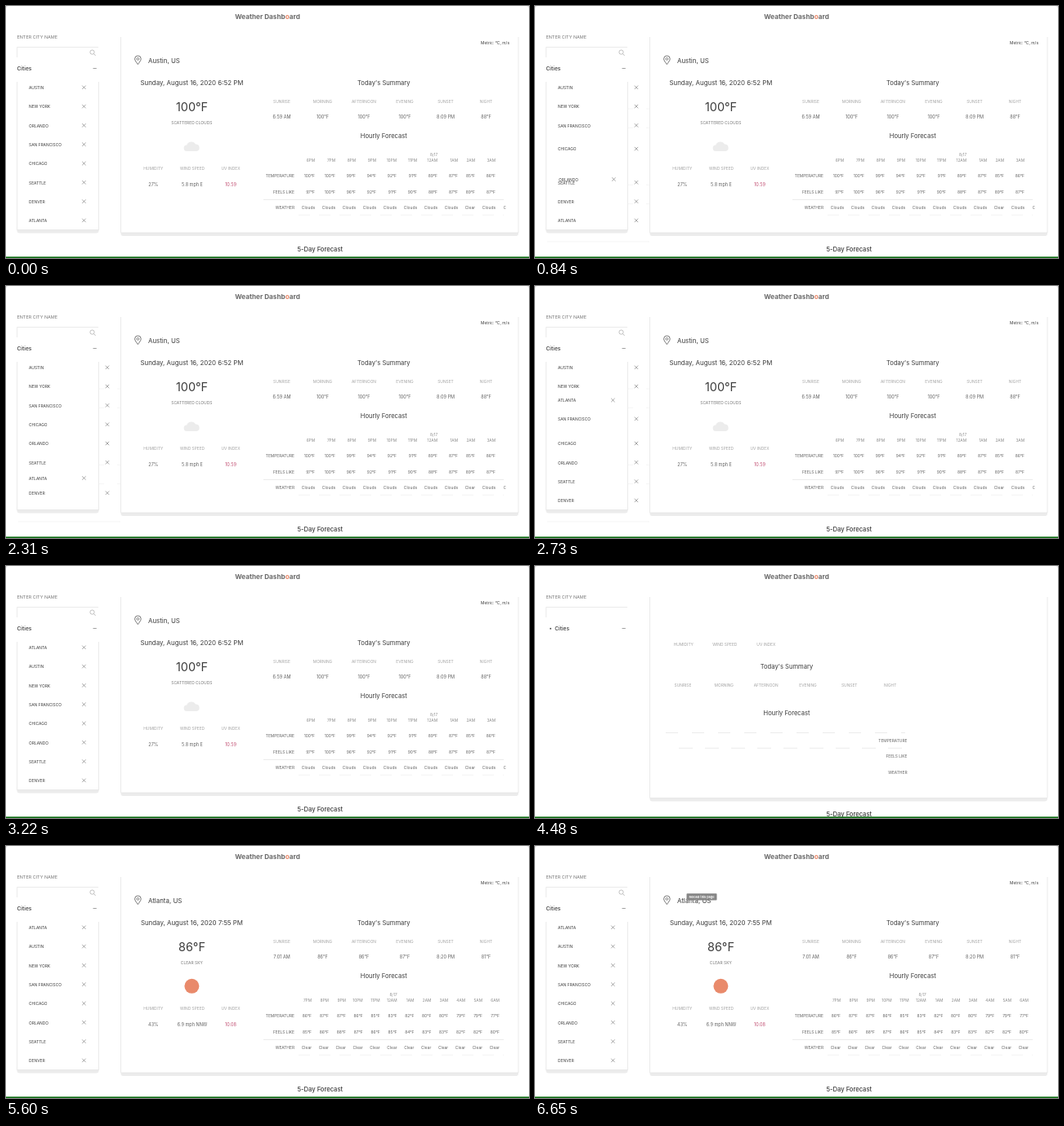
These frames come from a looping animation (640 by 309 pixels, 6860 ms). An HTML page:

```html
<!DOCTYPE html>
<html lang="en">
<head>
<meta charset="utf-8">
<title>Weather Dashboard</title>
<style>
  html, body { margin: 0; width: 100%; height: 100%; overflow: hidden; background: #fff; }
  svg { display: block; width: 640px; height: 309px; font-family: Inter, "Liberation Sans", sans-serif; }
</style>
</head>
<body>
<svg id="stage" viewBox="0 0 640 309"></svg>
<script>
const LOOP = 6860, STEP = 70, ROW = 23.3, TOP = 100.3;
const DARK = '#3c3c3c', MID = '#626262', PALE = '#a3a3a3', RULE = '#e2e2e2', SHADE = '#ececec';
const ORANGE = '#e98a6b', RED = '#c14f72';
const stage = document.getElementById('stage');

// Text centred vertically on y; anchor is s, m or e.
function text(x, y, str, size, fill = DARK, anchor = 'm', weight = 400) {
  const side = { s: 'start', m: 'middle', e: 'end' }[anchor];
  return `<text x="${x}" y="${(y + size * 0.364).toFixed(2)}" font-size="${size}" fill="${fill}" ` +
    `text-anchor="${side}" font-weight="${weight}">${str}</text>`;
}
const rect = (x, y, w, h, fill, rx = 0) =>
  `<rect x="${x}" y="${y}" width="${w}" height="${h}" rx="${rx}" fill="${fill}"/>`;
const line = (d, stroke = RULE, width = 0.7, extra = '') =>
  `<path d="${d}" fill="none" stroke="${stroke}" stroke-width="${width}" ${extra}/>`;
const group = (id, body) => `<g id="${id}">${body}</g>`;
const label = (x, y, str) => text(x, y, str, 4.85, PALE);
const heading = (x, y, str) => text(x, y, str, 7.6);
const labels = (xs, y, words) => xs.map((x, i) => label(x, y, words[i])).join('');
const card = (x, y, w, h) =>
  rect(x, y + h - 5, w, 9, SHADE, 3) + rect(x, y, w, h, '#fff') +
  line(`M${x} ${y}V${y + h}H${x + w}V${y}`);

const CURRENT = ['HUMIDITY', 'WIND SPEED', 'UV INDEX'];
const PARTS = ['SUNRISE', 'MORNING', 'AFTERNOON', 'EVENING', 'SUNSET', 'NIGHT'];
const ROWS = ['TEMPERATURE', 'FEELS LIKE', 'WEATHER'];
const PART_X = [337.5, 387.5, 438, 488, 538, 587.5];
const CURRENT_X = [180.3, 228, 275];
const fiveDay = y => text(384.3, y, '5-Day Forecast', 7.6, DARK, 'm', 500);
const rowNames = (x, y) => ROWS.map((r, i) => text(x, y + i * 19.3, r, 4.85, MID, 'e')).join('');

function sidebar() {
  return text(13.5, 38.5, 'ENTER CITY NAME', 5.45, '#777', 's') +
    line('M13.5 63V50.5H113') + line('M106.5 76.5h4.3', '#777');
}

const styled =
  line('M107.6 58.8l1.9 2', '#999') + '<circle cx="105.5" cy="56.6" r="2.6" fill="none" stroke="#999" stroke-width=".6"/>' +
  text(13.5, 76.3, 'Cities', 6.6, DARK, 's', 500) + card(13.5, 93, 100, 181.5);

const pin =
  line('M161.4 71.6C159.6 69 157.6 66.8 157.6 64.8A3.8 3.8 0 0 1 165.2 64.8C165.2 66.8 163.2 69 161.4 71.6Z', '#555', 0.8) +
  '<circle cx="161.4" cy="64.9" r="1.4" fill="none" stroke="#555" stroke-width=".7"/>';

const details = pin +
  text(616, 45.3, 'Metric: °C, m/s', 4.95, DARK, 'e') +
  heading(462.3, 94, "Today's Summary") + labels(PART_X, 116.8, PARTS);

const bare = card(140.5, 38, 486.5, 246.5) +
  '<circle cx="19" cy="76.8" r="1" fill="#555"/>' + text(24.2, 76.3, 'Cities', 6.6, DARK, 's', 500) +
  labels([181.8, 232.3, 282.8], 96.3, CURRENT) + heading(308, 123.3, "Today's Summary") +
  labels([181, 231.3, 282.7, 334, 384.7, 434.7], 146, PARTS) + heading(308, 180, 'Hourly Forecast') +
  line('M160 204.5H453', RULE, 0.7, 'stroke-dasharray="15 17"') +
  line('M176 223.3H460', RULE, 0.7, 'stroke-dasharray="17 15"') +
  rowNames(455.5, 214.3) + fiveDay(303.8);

function weekCards() {
  return ['Monday', 'Tuesday', 'Wednesday', 'Thursday', 'Friday'].map((day, i) => {
    const x = 140.8 + i * 97.8;
    return rect(x + 94.8, 291.5, i < 4 ? 4 : 1, 18, SHADE) +
      line(`M${x} 291.5V309`) + heading(x + 46.8, 307.6, day);
  }).join('');
}

const waiting = card(140.5, 38, 486.5, 217) +
  labels(CURRENT_X, 121.3, CURRENT) + heading(462.3, 150.7, 'Hourly Forecast') +
  line('M315 175.5H609') + line('M358 194.5H609', '#ebebeb', 0.7, 'stroke-dasharray="6 5"') +
  rowNames(353, 185) + fiveDay(274.3) + weekCards();

const tall = card(140.5, 38, 486.5, 240) +
  labels(CURRENT_X, 198.8, CURRENT) + heading(462.3, 159.3, 'Hourly Forecast') +
  line('M315 237.5H609') + line('M358 256.3H609', '#f0f0f0', 0.7, 'stroke-dasharray="14 11"') +
  rowNames(353, 208.7) + fiveDay(298.3);

function hourName(h) {
  return (h % 12 || 12) + (h % 24 < 12 ? 'AM' : 'PM');
}

// Returns measured values and, separately, everything tied to the local clock.
function report(r) {
  const cell = (x, y, s) => text(x, y, s, 4.9, MID, 'e');
  const data =
    text(227.5, 123.7, r.temp + '°F', 14.4) + text(227.3, 143, r.sky, 4.9, '#777') + r.icon +
    [r.humidity, r.wind, r.uv].map((s, i) => text(CURRENT_X[i], 218.8, s, 5.5, i < 2 ? MID : RED)).join('') +
    r.parts.map((p, i) => p ? text(PART_X[i], 136.4, p + '°F', 5.5, MID) : '').join('') +
    r.cols.map((x, i) =>
      (r.temps[i] ? cell(x, 208.7, r.temps[i] + '°F') + cell(x, 228, r.feels[i] + '°F') : '') +
      cell(x, 247.2, r.words(i))).join('');
  const clock =
    text(227.4, 94, `Sunday, August 16, 2020 ${r.time}`, 7.9) +
    text(PART_X[0], 136.4, r.rise, 5.5, MID) + text(PART_X[4], 136.4, r.set, 5.5, MID) +
    r.cols.map((x, i) => {
      if (!r.temps[i]) return '';
      const h = r.start + i;
      return text(x, 189.2, hourName(h), 4.8, '#888', 'e') +
        (h === 24 ? text(x, 182, '8/17', 4.6, '#888', 'e') : '');
    }).join('');
  return { data: `<g clip-path="url(#table)">${data}</g>`, clock };
}

const cloud = `<path d="M221.5 178a3.7 3.7 0 0 1-.3-7.4A5.9 5.9 0 0 1 232 169.5a4.3 4.3 0 0 1 1.2 8.5Z" fill="${SHADE}"/>`;
const sun = `<circle cx="227.4" cy="171.8" r="9" fill="${ORANGE}"/>`;

const austin = report({
  temp: 100, sky: 'SCATTERED CLOUDS', icon: cloud, humidity: '27%', wind: '5.8 mph E', uv: '10.59',
  parts: [0, 100, 100, 100, 0, 88], time: '6:52 PM', rise: '6:59 AM', set: '8:09 PM', start: 18,
  cols: [378, 403, 428, 453, 478, 503, 528, 553, 574, 599, 625],
  temps: [100, 100, 99, 94, 92, 91, 89, 87, 85, 86],
  feels: [97, 100, 96, 92, 91, 90, 88, 87, 89, 87],
  words: i => i === 8 ? 'Clear' : 'Clouds'
});
const atlanta = report({
  temp: 86, sky: 'CLEAR SKY', icon: sun, humidity: '43%', wind: '6.9 mph NNW', uv: '10.08',
  parts: [0, 86, 86, 87, 0, 81], time: '7:55 PM', rise: '7:01 AM', set: '8:20 PM', start: 19,
  cols: Array.from({ length: 12 }, (_, i) => 374 + i * 20.9),
  temps: [86, 87, 87, 86, 85, 83, 82, 80, 80, 79, 79, 77],
  feels: [85, 86, 88, 87, 86, 85, 84, 83, 83, 82, 82, 80],
  words: () => 'Clear'
});

const cities = ['Austin', 'New York', 'Orlando', 'San Francisco', 'Chicago', 'Seattle', 'Denver', 'Atlanta'];
const cityRows = cities.map((c, i) => group('city' + i,
  text(28, 0, c.toUpperCase(), 4.9, DARK, 's') +
  `<path id="del${i}" d="M93.2-2.7l4.4 4.4m0-4.4l-4.4 4.4" stroke="#777" stroke-width=".65"/>`)).join('');

const spill = line('M114 126H140M114 149.3H140M114 219.3H140M114 242.6H140', '#f1f1f1', 0.7, 'stroke-dasharray="6 16"') +
  line('M15 289H140', '#f0f0f0');

stage.innerHTML =
  '<clipPath id="table"><rect x="141" y="90" width="470.5" height="180"/></clipPath>' +
  rect(0, 0, 640, 6, '#e3e3e3') + rect(0, 0, 640, 40, '#fff', 4) +
  text(320, 13.2, `Weather Dashb<tspan fill="${ORANGE}">o</tspan>ard`, 8.2, '#6b6b6b', 'm', 700) +
  group('bare', bare) + group('waiting', waiting) + group('tall', tall) +
  sidebar() + group('styled', styled) + group('spill', spill) + group('list', cityRows) +
  group('details', details) +
  group('placeA', text(174, 67, 'Austin, US', 7.9, DARK, 's')) +
  group('placeB', text(174, 67, 'Atlanta, US', 7.9, DARK, 's')) +
  group('austin', austin.data + austin.clock) +
  group('atlanta', atlanta.data) + group('clock', atlanta.clock) +
  group('tip', rect(185.5, 58.3, 37, 8.2, '#858585', 0.8) + text(204, 62.2, 'Reload this page', 3.9, '#fff', 'm', 600)) +
  rect(0, 307.4, 640, 1.6, '#0a6b0f');

const el = id => document.getElementById(id);
const show = (id, on) => { el(id).style.display = on ? '' : 'none'; };
const clamp = v => Math.max(0, Math.min(1, v));

// Visible time spans in ms.
const SPANS = {
  austin: [0, 4480], placeA: [0, 4480], bare: [4480, 4550], waiting: [4550, 5320],
  placeB: [4830, LOOP], atlanta: [5320, LOOP], clock: [5600, LOOP], tip: [5950, LOOP]
};

// Drags: city, start and end slot, how early neighbours yield, pointer path.
const DRAGS = [
  { who: 2, from: 2, to: 4, lead: -1.6, path: [[630, 153], [700, 172], [770, 196], [840, 213], [910, 217], [980, 193.5]] },
  { who: 7, from: 7, to: 0, lead: 10, path: [[2310, 236], [2520, 196], [2800, 122], [2940, 98], [3010, 94], [3150, 93.5], [3220, 100.3]] }
];

function along(path, t) {
  const i = path.findIndex(p => p[0] > t);
  const [t0, y0] = path[i - 1], [t1, y1] = path[i];
  return y0 + (y1 - y0) * (t - t0) / (t1 - t0);
}

function placeCities(t) {
  let order = cities.map((_, i) => i), active = null, held = 0;
  for (const d of DRAGS) {
    const end = d.path[d.path.length - 1][0];
    if (t >= end) {
      order.splice(d.to, 0, order.splice(d.from, 1)[0]);
    } else if (t >= d.path[0][0]) {
      active = d;
      held = along(d.path, t);
    }
  }
  order.forEach((city, slot) => {
    let x = 0, y = TOP + ROW * slot, mark = 0;
    if (active) {
      const { who, from, to, lead } = active, dir = Math.sign(to - from);
      if (city === who) {
        y = held;
        x = dir > 0 ? 1 : 0;
      } else {
        mark = 28.6;
        const between = (slot - from) * dir > 0 && (to - slot) * dir >= 0;
        if (between) y -= dir * ROW * clamp(((held - y) * dir + lead) / ROW);
      }
    }
    el('city' + city).setAttribute('transform', `translate(${x} ${y})`);
    el('del' + city).setAttribute('transform', `translate(${mark} 0)`);
  });
  show('spill', active);
}

function draw() {
  const t = Math.floor(performance.now() % LOOP / STEP) * STEP;
  for (const id in SPANS) show(id, t >= SPANS[id][0] && t < SPANS[id][1]);
  const reset = t >= 4480 && t < 4550;
  for (const id of ['styled', 'list', 'details']) show(id, !reset);
  show('tall', t < 4480 || t >= 5320);
  placeCities(t);
  requestAnimationFrame(draw);
}
draw();
</script>
</body>
</html>
```
